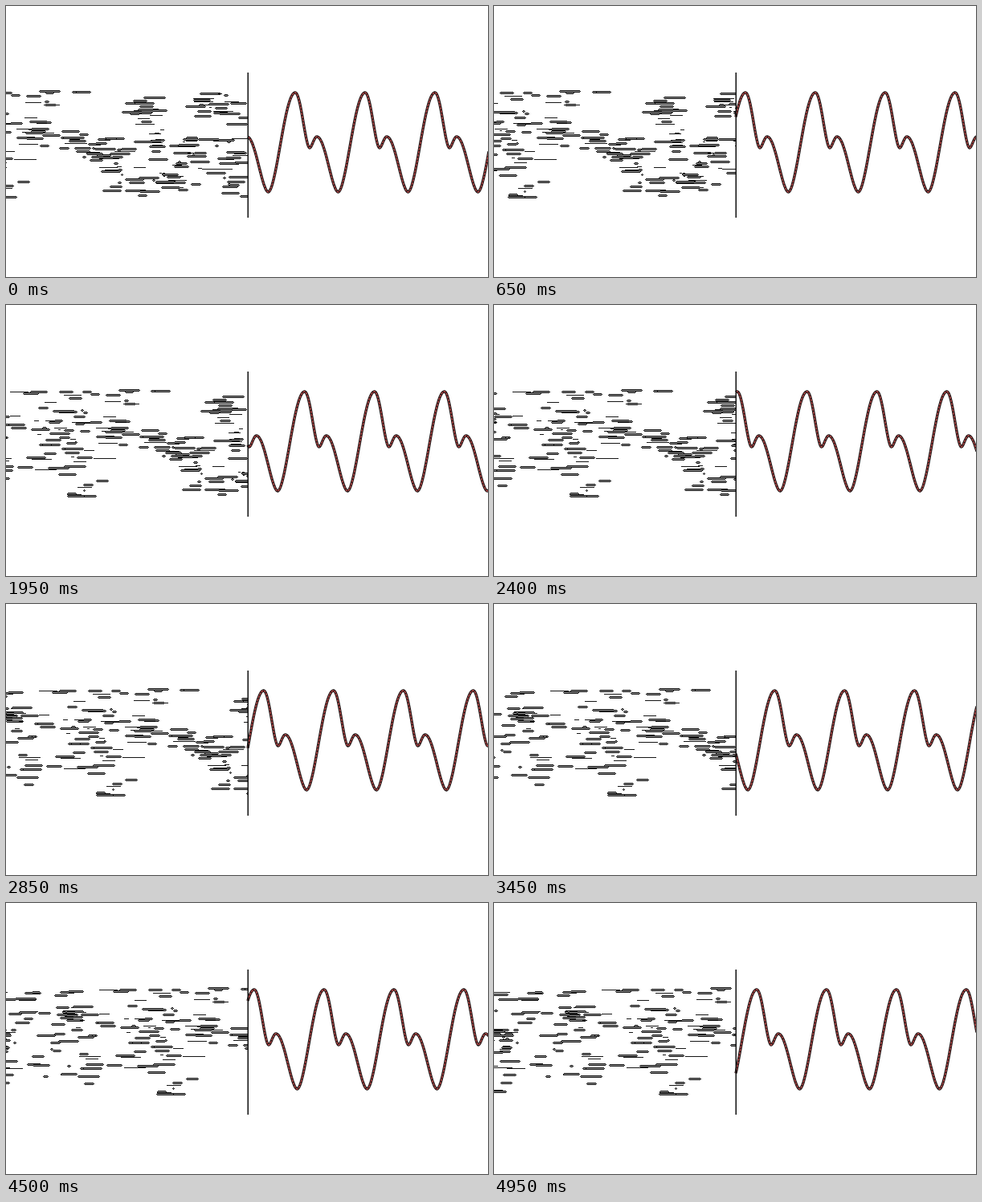
These frames come from a looping animation (600x338 px, 5 s). An HTML page with a canvas:

```html
<!DOCTYPE html>
<html lang="en">
<head>
<meta charset="utf-8">
<title>Scrolling signals</title>
<style>
  html, body { margin: 0; width: 100%; height: 100%; overflow: hidden; background: #fff; }
  canvas { display: block; }
</style>
</head>
<body>
<canvas id="stage" width="600" height="338"></canvas>
<script>
const ctx = document.getElementById('stage').getContext('2d');
const STEP = 50, STEPS = 100, DIVIDER = 301, PERIOD = 87;

// [step, scrolled distance in px]: mostly 2 px per step, with two faster stretches
const scroll = [[0, 0], [13, 40], [26, 72.7], [39, 98.7], [57, 134.7], [80, 190], [99, 228]];

// [phase in px, y] of the turning points of one wave period
const turns = [[0, 108], [18, 177], [27, 163], [53.5, 232], [PERIOD, 108]];

// Centres [x, y] where the noise bunches up
const bundles = [
  [-222, 162], [-123, 138], [-43, 152], [-7, 231], [48, 152], [98, 177],
  [165, 130], [183, 165], [222, 175], [258, 126], [286, 188], [206, 217]
];

// Ellipses [x, y, rx, ry] that the noise leaves empty
const voids = [
  [80, 225, 48, 40], [115, 130, 38, 27], [213, 130, 17, 26], [-55, 236, 36, 24], [-165, 244, 60, 24]
];

let seed = 7;
const random = () => (seed = seed * 16807 % 2147483647) / 2147483647;
const range = (lo, hi) => lo + random() * (hi - lo);

function makeStrokes() {
  const strokes = [];
  const add = (x, y) => strokes.push({
    x, y: Math.round(Math.min(238, Math.max(106, y))),
    w: random() < 0.15 ? range(1, 5) : range(9, 26),
    thin: random() < 0.25
  });
  for (const [x, y] of bundles) {
    for (let i = 0; i < 9; i++) add(x + range(-13, 13), y + range(-11, 11));
  }
  for (let i = 0; i < 290; i++) {
    const x = range(-230, 300), y = range(106, 238);
    const empty = voids.some(([vx, vy, rx, ry]) => Math.hypot((x - vx) / rx, (y - vy) / ry) < 1);
    if (!empty) add(x, y);
  }
  return strokes;
}

const strokes = makeStrokes();

function between(points, at, ease = k => k) {
  const i = Math.max(1, points.findIndex(p => p[0] >= at));
  const [a, from] = points[i - 1], [b, to] = points[i];
  return from + (to - from) * ease((at - a) / (b - a), to > from);
}

// Cosine easing, a little sharper at the lower end of the curve
function swing(k, falling) {
  const rise = q => (1 - Math.cos(Math.PI * q ** 0.9)) / 2;
  return falling ? 1 - rise(1 - k) : rise(k);
}

function line(x1, x2, y, width, color) {
  ctx.fillStyle = color;
  ctx.fillRect(x1, y - (width - 1) / 2, x2 - x1, width);
}

function drawStrokes(shift) {
  ctx.save();
  ctx.beginPath();
  ctx.rect(0, 0, DIVIDER, 338);
  ctx.clip();
  for (const { x, y, w, thin } of strokes) {
    const left = Math.round(x - w / 2 + shift), right = left + Math.round(w);
    line(left - 1, right + 1, y, 1, '#161616');
    if (thin) continue;
    line(left, right, y, 3, '#161616');
    line(left, right, y, 1, '#8c8c8c');
  }
  ctx.restore();
}

function drawWave(shift) {
  ctx.beginPath();
  for (let x = DIVIDER; x <= 601; x += 0.5) {
    const phase = (x - 360 - shift + 10 * PERIOD) % PERIOD;
    ctx.lineTo(x, between(turns, phase, swing));
  }
  ctx.lineJoin = 'round';
  for (const [color, width, dash] of [['#1c1414', 3.4, []], ['#b84848', 1.5, [3, 1]]]) {
    ctx.strokeStyle = color;
    ctx.lineWidth = width;
    ctx.setLineDash(dash);
    ctx.stroke();
  }
}

function draw() {
  const step = Math.floor(performance.now() / STEP) % STEPS;
  const shift = between(scroll, step);
  ctx.fillStyle = '#fff';
  ctx.fillRect(0, 0, 600, 338);
  drawStrokes(shift);
  drawWave(shift);
  ctx.fillStyle = '#111';
  ctx.fillRect(DIVIDER - 0.5, 83, 1.5, 181);
  requestAnimationFrame(draw);
}
draw();
</script>
</body>
</html>
```
